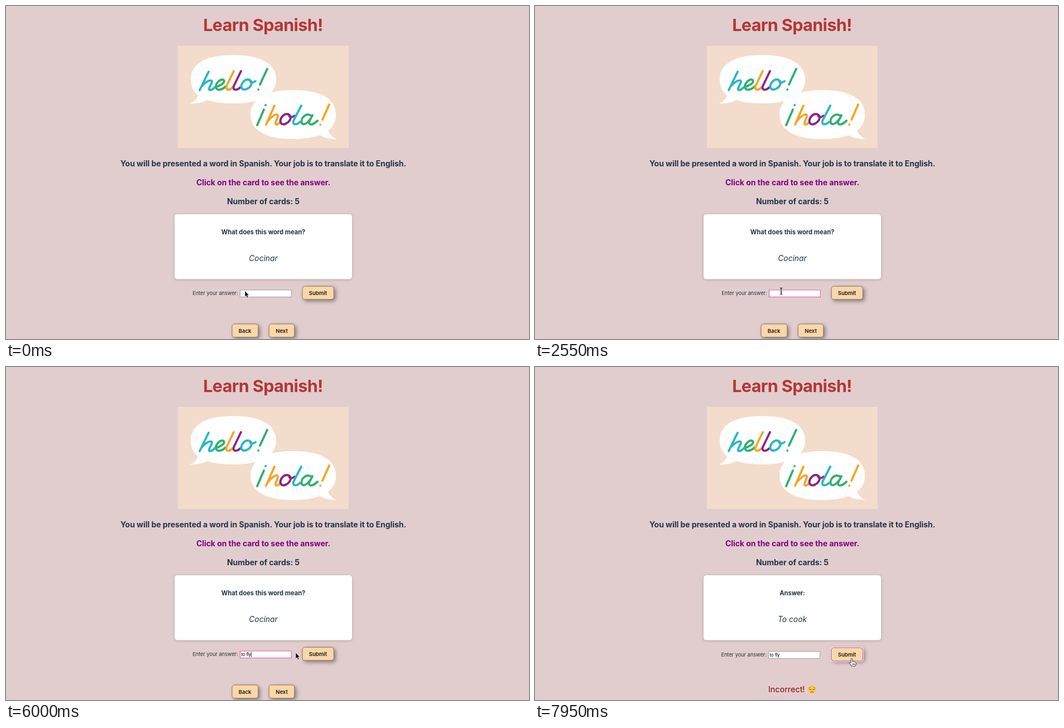
Recreate the animation shown at these times as an HTML page. Size 937 by 598 pixels, loop 8 s.

```html
<!DOCTYPE html>
<html lang="en">
<head>
<meta charset="utf-8">
<title>Learn Spanish</title>
<style>
html, body { margin: 0; width: 100%; height: 100%; overflow: hidden; background: #e1cdce; }
svg { display: block; width: 937px; height: 598px; }
text { font: 400 9.2px Inter, sans-serif; fill: #213547; }
.mid { text-anchor: middle; }
.title { font-size: 30.5px; font-weight: 700; letter-spacing: -.02em; fill: #b43636; }
.lead { font-size: 14px; font-weight: 700; letter-spacing: -.004em; }
.hint { fill: #800080; }
.question { font-size: 11.15px; font-weight: 700; }
.word { font-size: 13.8px; font-weight: 450; font-style: italic; }
.verdict { font-size: 14.4px; fill: #8b0000; }
.typed { font: 8.2px "Liberation Sans", Arial, sans-serif; fill: #000; white-space: pre; }
.card { fill: #fff; filter: drop-shadow(0 1.5px 2.5px #0003); }
.button { fill: #fad7a8; stroke: #6b5f58; stroke-width: .8; filter: drop-shadow(3.5px 3.5px 3.5px #0006); }
.label { font-size: 9.5px; font-weight: 600; fill: #1a1a1a; }
.script { fill: none; stroke-width: 3.9; stroke-linecap: round; stroke-linejoin: round; }
.teal { stroke: #2bb5c9; } .green { stroke: #2fb06f; } .orange { stroke: #f5a623; } .purple { stroke: #8a2488; }
</style>
</head>
<body>
<svg viewBox="0 0 937 598">
  <text class="mid title" x="460.5" y="45.3">Learn Spanish!</text>

  <rect x="308" y="71.5" width="306" height="183.7" fill="#f3dccb"/>
  <g fill="#fff">
    <path d="M407 88C455 88 484 103 484 132S455 175 407 175Q380 175 361 169Q346 176 330 175Q341 170 344 161Q331 150 331 132C331 103 359 88 407 88Z"/>
    <path d="M515 151C563 151 591 166 591 195Q591 213 577 224Q581 234 592 239Q574 239 562 232Q542 239 515 239C467 239 438 224 438 195S467 151 515 151Z"/>
  </g>
  <g class="script">
    <path class="green" d="M374 146C382 144 394 138 390 133C385 129 375 139 376 146C378 153 387 151 394 144"/>
    <path class="teal" d="M363 118L347 151M350 145C356 138 364 132 368 134C372 137 362 146 364 150C366 152 370 150 374 146"/>
    <path class="orange" d="M408 117L395 144C393 151 399 153 406 146"/>
    <path class="purple" d="M421 117L408 144C406 151 412 153 420 146"/>
    <path class="teal" d="M437 133C428 129 420 140 422 147C425 154 438 148 440 139C440 135 437 133 437 133Q438 141 447 135"/>
    <path class="green" d="M468 113L455 141M452 150h.1"/>

    <path class="green" d="M465 178h.1M462 186L450 214"/>
    <path class="orange" d="M481 179L466 213M469 207C475 200 482 193 486 195C490 198 481 208 483 212C485 214 489 211 492 208"/>
    <path class="purple" d="M507 195C498 191 490 202 492 209C495 217 508 210 510 201C510 197 507 195 507 195Q508 203 517 197"/>
    <path class="teal" d="M529 179L515 206C513 213 519 215 527 208"/>
    <path class="green" d="M547 197C538 190 527 202 530 210C534 217 545 206 549 196L543 208C542 215 550 214 558 206"/>
    <path class="orange" d="M579 177L567 204M563 213h.1"/>
  </g>

  <text class="mid lead" x="461" y="287.5">You will be presented a word in Spanish. Your job is to translate it to English.</text>
  <text class="mid lead hint" x="461" y="321.5">Click on the card to see the answer.</text>
  <text class="mid lead" x="461" y="356">Number of cards: 5</text>

  <rect class="card" x="302" y="374" width="318" height="116.5" rx="5"/>
  <text class="mid question" id="question" x="461" y="410.4"></text>
  <text class="mid word" id="word" x="461" y="458"></text>

  <g id="form">
    <text x="334.2" y="519">Enter your answer:</text>
    <rect id="halo" x="418.9" y="508.9" width="93.4" height="14.4" rx="1.5" fill="#fff"/>
    <rect id="field" x="419.6" y="510" width="91.8" height="12.6" fill="#fff"/>
    <text class="typed" id="typed" x="421.6" y="519"></text>
    <path id="caret" d="M0 511.5v9.5" stroke="#000" stroke-width=".8"/>
  </g>

  <rect class="button" x="531" y="503.3" width="56.3" height="23.6" rx="4.5"/>
  <g id="ring">
    <rect x="529" y="502.5" width="60" height="27" rx="6" fill="#fff"/>
    <rect x="530.5" y="504" width="57" height="24" rx="4.8" fill="#fad7a8" stroke="#b84aa4" stroke-width="1.1"/>
  </g>
  <text class="mid label" id="submit" x="559" y="519">Submit</text>

  <g id="nav">
    <rect class="button" x="405" y="571" width="46.8" height="23.8" rx="4.5"/>
    <text class="mid label" x="428.2" y="587">Back</text>
    <rect class="button" x="471.2" y="571" width="45.6" height="23.8" rx="4.5"/>
    <text class="mid label" x="494" y="587">Next</text>
  </g>

  <g id="verdict">
    <text class="verdict" x="418" y="584">Incorrect!</text>
    <circle cx="496.3" cy="579.2" r="7.1" fill="#fcca45"/>
    <g fill="none" stroke="#6b4314" stroke-width="1" stroke-linecap="round">
      <path d="M491.2 578.6q1.7 1.9 3.6.3M497.8 578.9q1.9 1.6 3.6-.3M493.8 584q2.5-1.8 5 0"/>
      <path d="M490.9 576.2q2-.4 3.2-1.8M498.5 574.4q1.2 1.4 3.2 1.8" stroke-width=".7"/>
    </g>
  </g>

  <g id="cursor">
    <circle id="click" r="7.7" fill="#fff4" stroke="#222" stroke-width=".9"/>
    <path id="arrow" d="M0 0V10.8L2.4 8.6L4.2 12.4L6 11.6L4.3 7.9H7.5Z" stroke="#fff" stroke-width=".6"/>
    <path id="beam" d="M-2.4-5.8Q0-5.8 0-4.4Q0-5.8 2.4-5.8M0-4.4V4.6M-2.4 6Q0 6 0 4.6Q0 6 2.4 6M-1.3 2H1.3" fill="none" stroke="#111" stroke-width="1.1"/>
    <path id="hand" d="M-1.9 9V2.6a1.4 1.4 0 0 1 2.8 0V6.4q1.4-.8 2.4.3q1.3-.5 2 .6q1.7-.2 1.8 1.5q.1 3-1.4 5.8H-.9C-1.7 12.5-4.3 10.8-4.8 9.2q.5-1.8 2.9-.2ZM1.1 10v2.5M2.8 10v2.5M4.5 10v2.5" fill="#fff" stroke="#111" stroke-width=".8" stroke-linejoin="round"/>
  </g>
</svg>
<script>
const LOOP = 8000, STEP = 150;
const FOCUS = 1050, SUBMIT = 6450, REVEAL = 6750;
const ANSWER = 'to fly';
const keyTimes = [2700, 2850, 3000, 4650, 4800, 4950];
const caretOff = [[1500, 1950], [2550, 2700], [3450, 3900], [4500, 4650], [5550, 6000]];
// time, x, y
const path = [
  [0, 428, 511.5], [150, 431, 512.5], [900, 447, 518], [1200, 447, 518], [1500, 441, 512],
  [5400, 441, 512], [5700, 460, 512], [6000, 519, 513], [6450, 562, 522.5],
  [7500, 562, 522.5], [7950, 568, 522.5], [LOOP, 568, 522.5]
];

const $ = id => document.getElementById(id);
const show = (id, on) => $(id).setAttribute('visibility', on ? 'visible' : 'hidden');
const move = (id, x, y) => $(id).setAttribute('transform', `translate(${x} ${y})`);
const within = (t, [from, to]) => t >= from && t < to;

function pointerAt(t) {
  const i = path.findIndex(p => p[0] > t);
  const [t0, x0, y0] = path[i - 1], [t1, x1, y1] = path[i];
  const k = (t - t0) / (t1 - t0);
  return [x0 + (x1 - x0) * k, y0 + (y1 - y0) * k];
}

function drawForm(t) {
  const focused = within(t, [FOCUS, SUBMIT]), submitted = t >= SUBMIT, revealed = t >= REVEAL;
  $('question').textContent = revealed ? 'Answer:' : 'What does this word mean?';
  $('word').textContent = revealed ? 'To cook' : 'Cocinar';

  $('typed').textContent = ANSWER.slice(0, keyTimes.filter(k => t >= k).length);
  move('caret', 422 + $('typed').getComputedTextLength(), 0);
  show('caret', focused && !caretOff.some(span => within(t, span)));
  show('halo', focused);
  $('field').setAttribute('stroke', focused ? '#e0529f' : '#858085');
  $('field').setAttribute('stroke-width', focused ? 1.1 : .7);

  move('form', submitted ? -.8 : 0, submitted ? .9 : 0);
  move('submit', 0, submitted ? .9 : 0);
  move('nav', 0, submitted ? 1.3 : 0);
  show('ring', submitted);
  show('nav', !revealed);
  show('verdict', revealed);
}

function drawPointer(t) {
  const [x, y] = pointerAt(t);
  const shape = x > 531 ? 'hand' : t < 300 || x > 512 ? 'arrow' : 'beam';
  move('cursor', x, y);
  for (const id of ['arrow', 'beam', 'hand']) show(id, id === shape);
  show('click', within(t, [FOCUS, 1350]) || within(t, [SUBMIT, REVEAL]));
}

function frame(now) {
  const t = Math.floor(now % LOOP / STEP) * STEP;
  drawForm(t);
  drawPointer(t);
  requestAnimationFrame(frame);
}
frame(0);
</script>
</body>
</html>
```
